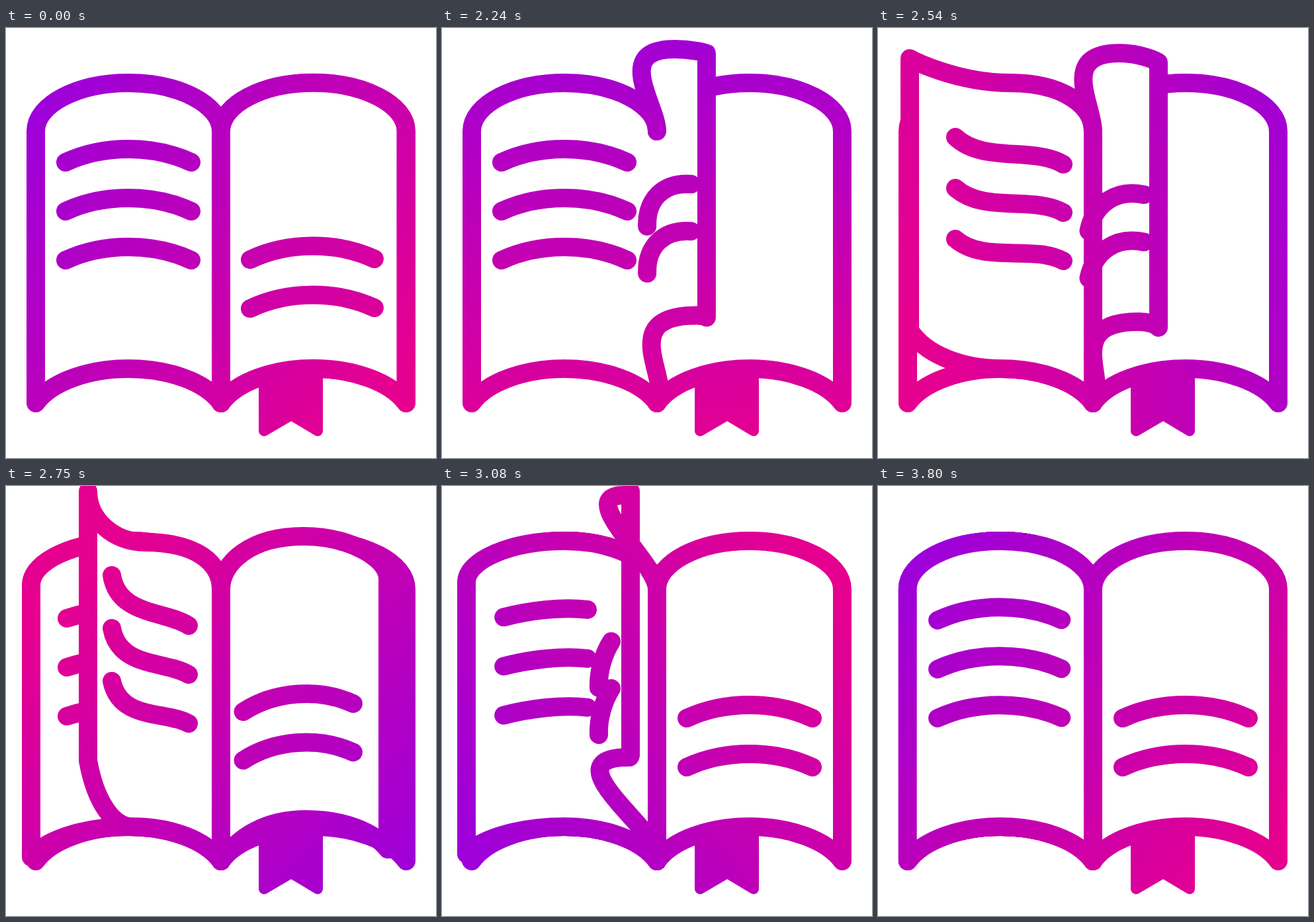
These frames come from a looping animation (650 px wide and 650 px high, 3.83 s). An HTML page:

```html
<!DOCTYPE html>
<html lang="en">
<head>
<meta charset="utf-8">
<title>Turning pages</title>
<style>
  html, body { margin: 0; width: 100%; height: 100%; overflow: hidden; background: #fff; }
  svg { display: block; width: 100%; height: 100%; }
  path { stroke: url(#ink); stroke-width: 28; stroke-linecap: round; stroke-linejoin: round; fill: none; }
  .sheet { fill: #fff; }
  .ribbon { fill: url(#ink); stroke-width: 16; }
</style>
</head>
<body>
<svg viewBox="0 0 650 650">
  <defs>
    <linearGradient id="ink" gradientUnits="userSpaceOnUse" x1="-18" y1="339" x2="662" y2="339">
      <stop offset="0" stop-color="#9d00d9"/>
      <stop offset="1" stop-color="#e6008f"/>
    </linearGradient>
  </defs>
  <path class="ribbon" d="M390 520H471V609L431 585L390 609Z"/>
  <g id="book"></g>
  <g id="pages"></g>
  <path id="spine" d="M325 158V567"/>
</svg>
<script>
const LOOP = 3830, STEP = 30, FIRST_STEP = 2030, TURN_START = 1992;
const PAGE_STARTS = [0, 340, 696], LAST_TEXT = 1040, FLIP = 405;
const SPINE_X = 325, RIGHT = 1, LEFT = -1;

const linear = k => k;
const smooth = k => k * k * (3 - 2 * k);
const halfSmooth = k => (k + smooth(k)) / 2;
const square = k => k * k;

// Sheet poses: x is the distance from the spine, so both sides share them.
const flat = {
  crest: [140, 83], reach: 77, corner: [280, 156], bend: 0.55,
  height: 411, low: [140, 515], lowReach: 59
};
const folded = {
  crest: [25, 31], reach: 95, corner: [71, 36], bend: 0,
  height: 399, low: [58, 433], lowReach: 125
};
const upright = { ...folded, crest: [-50, 14], reach: 75, corner: [-40, 8], low: [-42, 410], lowReach: 129 };
const falling = { ...flat, crest: [115, 85], corner: [201, 8], height: 407, low: [135, 515] };
const lowering = { ...flat, crest: [125, 83], corner: [277, 46], bend: 0 };
const widest = { ...flat, corner: [298, 100], bend: 0.3 };
const landed = { ...flat, corner: [287, 150] };

// Text poses: near and far line ends, arch of each half, line gap at each end.
const leftLines = { near: [45, 203], far: [235, 203], arch: [26.7, 26.7], gap: [74, 74] };
const rightLines = { ...leftLines, near: [45, 351], far: [235, 351] };
const foldedLines = { near: [-18, 297], far: [42, 230], arch: [31, 31], gap: [71, 71] };
const uprightLines = { ...foldedLines, near: [-88, 305], far: [-69, 235], arch: [7, 7] };
const fallingLines = { near: [49, 211], far: [165, 135], arch: [0, -46], gap: [74, 80] };
const loweringLines = { near: [45, 206], far: [208, 165], arch: [15, -28], gap: [73, 77] };
const landedLines = { ...leftLines, near: [108, 186], far: [233, 200], arch: [8, 8] };

// Each key: time, pose, easing towards it.
const front = {
  side: RIGHT, lines: 2,
  sheet: [[0, flat], [270, folded, smooth], [392, upright]],
  text: [[0, rightLines], [270, foldedLines, halfSmooth], [392, uprightLines]]
};
const back = {
  side: LEFT, lines: 3,
  sheet: [[418, falling], [548, lowering], [650, widest], [758, landed], [1120, flat, square]],
  text: [[418, fallingLines], [548, loweringLines], [758, landedLines], [1120, leftLines, square]]
};

function mix(a, b, k) {
  if (typeof a === 'number') return a + (b - a) * k;
  if (Array.isArray(a)) return a.map((v, i) => mix(v, b[i], k));
  return Object.fromEntries(Object.keys(a).map(name => [name, mix(a[name], b[name], k)]));
}

function sample(keys, time) {
  const next = keys.findIndex(([at]) => at > time);
  if (next === 0) return keys[0][1];
  if (next < 0) return keys[keys.length - 1][1];
  const [from, a] = keys[next - 1], [to, b, ease = linear] = keys[next];
  return mix(a, b, ease((time - from) / (to - from)));
}

const pointOn = side => (x, y) => `${SPINE_X + side * x} ${y} `;

function sheetPath(pose, side) {
  const { crest: [cx, cy], corner: [ox, oy], low: [lx, ly], reach, lowReach, bend, height } = pose;
  const pt = pointOn(side), foot = oy + height, lowSpan = ox - lx;
  return 'M' + pt(0, 156) +
    'C' + pt(0, 116) + pt(cx - reach, cy) + pt(cx, cy) +
    'C' + pt(cx + 0.55 * (ox - cx), cy) + pt(ox, oy + bend * (cy - oy)) + pt(ox, oy) +
    'L' + pt(ox, foot) +
    'C' + pt(ox - 0.17 * lowSpan, foot + 0.63 * (ly - foot)) + pt(lx + 0.42 * lowSpan, ly) + pt(lx, ly) +
    'C' + pt(lx - lowReach, ly) + pt(24, 534) + pt(0, 567);
}

function linePath({ near, far, arch, gap }, side, row) {
  const pt = pointOn(side);
  const [x1, y1] = [near[0], near[1] + row * gap[0]];
  const [x2, y2] = [far[0], far[1] + row * gap[1]];
  const dx = x2 - x1, dy = y2 - y1, length = Math.hypot(dx, dy);
  const control = (k, rise) => pt(x1 + k * dx + rise * dy / length, y1 + k * dy - rise * dx / length);
  return 'M' + pt(x1, y1) + 'C' + control(0.3, arch[0]) + control(0.7, arch[1]) + pt(x2, y2);
}

const textPath = (pose, { side, lines }) =>
  Array.from({ length: lines }, (_, row) => linePath(pose, side, row)).join('');

const byId = id => document.getElementById(id);
const show = (el, on) => el.setAttribute('visibility', on ? 'visible' : 'hidden');

function addPath(parent, className, d = '') {
  const path = document.createElementNS('http://www.w3.org/2000/svg', 'path');
  path.setAttribute('class', className);
  path.setAttribute('d', d);
  return byId(parent).appendChild(path);
}

addPath('book', 'outline', sheetPath(flat, LEFT));
addPath('book', 'outline', sheetPath(flat, RIGHT));
addPath('book', 'text', textPath(leftLines, back));
const lastText = addPath('book', 'text', textPath(rightLines, front));
const pages = PAGE_STARTS.map(start => ({
  start, sheet: addPath('pages', 'sheet'), text: addPath('pages', 'text')
}));

function draw(ms) {
  const stepped = FIRST_STEP + STEP * Math.floor((ms - FIRST_STEP) / STEP);
  const turn = Math.max(stepped - TURN_START, 8);

  for (const { start, sheet, text } of pages) {
    const phase = turn - start, face = phase < FLIP ? front : back;
    show(sheet, phase >= 0);
    show(text, phase >= 0);
    sheet.setAttribute('d', sheetPath(sample(face.sheet, Math.max(phase, 0)), face.side));
    text.setAttribute('d', textPath(sample(face.text, Math.max(phase, 0)), face));
  }
  show(lastText, turn >= LAST_TEXT);
  show(byId('spine'), turn < 70 || turn > FLIP);

  const angle = 38 + 360 * Math.min(turn / 1320, 1) ** 1.2;
  byId('ink').setAttribute('gradientTransform', `rotate(${angle} 347 339)`);
}

const began = performance.now();
function tick() {
  draw((performance.now() - began) % LOOP);
  requestAnimationFrame(tick);
}
tick();
</script>
</body>
</html>
```
